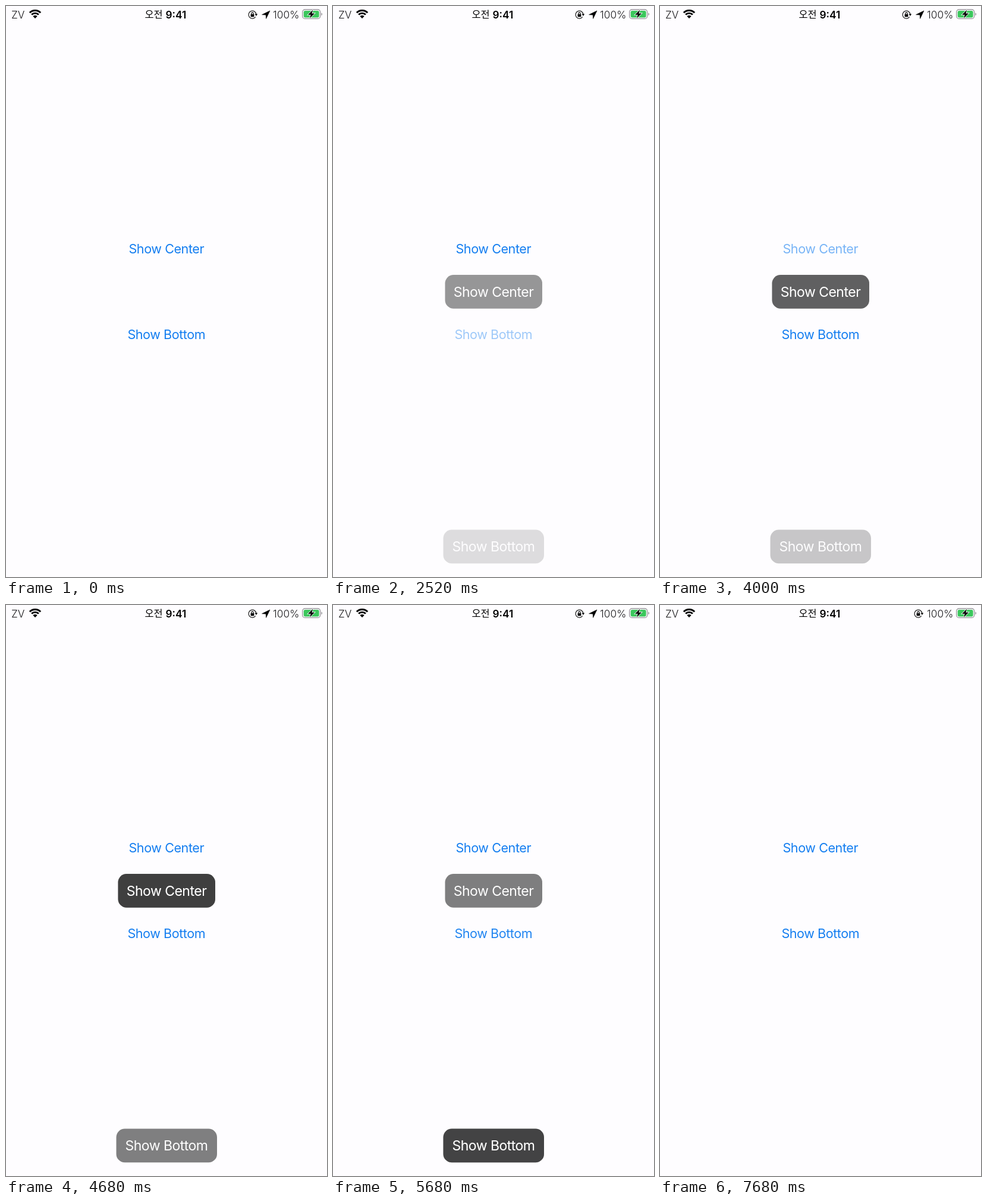
An HTML page for the animation above (7.76 s loop, 540 by 960 pixels).

```html
<!DOCTYPE html>
<html lang="ko">
<head>
<meta charset="utf-8">
<title>Toast demo</title>
<style>
  html, body { margin: 0; width: 100%; height: 100%; overflow: hidden; background: #fefdff; }
  svg { display: block; width: 540px; height: 960px; font-family: Inter, "Noto Sans", sans-serif; }
  .button { font-size: 21.6px; letter-spacing: -.021em; text-anchor: middle; fill: #147ef0; }
  .toast text { font-size: 23.04px; letter-spacing: -.023em; text-anchor: middle; fill: #fff; }
  .toast rect { fill: #000; fill-opacity: .5; }
  .status { font-size: 17.3px; }
  .thin { font-weight: 300; fill: #1c1c1e; }
  .clock { font-weight: 600; }
  .hangul { font: 500 16.4px "Noto Sans CJK KR", "Noto Sans CJK", sans-serif; }
</style>
</head>
<body>
<svg viewBox="0 0 540 960">
  <g class="status">
    <text class="thin" x="9" y="20.7">ZV</text>
    <g fill="none" stroke="#000" stroke-width="2.9">
      <path d="M39.8 11.3a13 13 0 0 1 18.4 0M43.1 14.6a8.3 8.3 0 0 1 11.8 0"/>
      <path d="M49 20.9l-3.6-3.6a5.1 5.1 0 0 1 7.2 0z" fill="#000" stroke="none"/>
    </g>
    <text class="hangul" x="233.5" y="20.3">오전</text>
    <text class="clock" x="268.5" y="20.6">9:41</text>
    <g id="lock">
      <path d="M419.7 18.4a6.4 6.4 0 1 1 1.2-4.4" fill="none" stroke="#222" stroke-width="1.3"/>
      <path d="M418.5 13.4h4.8l-2.4 3.4z"/>
      <rect x="411.6" y="13.7" width="5.8" height="4.5" rx=".8"/>
      <path d="M412.8 14v-1.4a1.7 1.7 0 0 1 3.4 0v1.4" fill="none" stroke="#000" stroke-width="1.1"/>
    </g>
    <path id="arrow" d="M444 8L430.6 14.6L437.2 15L437.6 21.3Z" stroke="#000" stroke-width=".6" stroke-linejoin="round"/>
    <text class="thin" x="449" y="20.7">100%</text>
    <rect x="498.7" y="6" width="30" height="15.4" rx="4.3" fill="none" stroke="#98989c" stroke-width="1.3"/>
    <rect x="500.7" y="8" width="26" height="11.4" rx="2.6" fill="#3bc75c"/>
    <path d="M530.4 11.2a2.7 2.7 0 0 1 0 5z" fill="#98989c"/>
    <path d="M516.3 6.6L508 14.8H512.7L510.9 20.8L519.2 12.4H514.4Z" stroke="#fff" stroke-width="1.6" paint-order="stroke"/>
  </g>
  <text id="centerButton" class="button" x="269.8" y="416.3">Show Center</text>
  <text id="bottomButton" class="button" x="269.8" y="560.3">Show Bottom</text>
  <g id="toasts"></g>
</svg>
<script>
  const LOOP = 7760, STEP = 40;
  const FADE_IN = 360, FADE_OUT = 440, LIFE = 1360, PRESS = 75;
  const ARROW_OFF = 5800;

  const byId = id => document.getElementById(id);
  const spots = {
    center: { label: 'Show Center', x: 188.5, y: 452, width: 163.5, button: byId('centerButton') },
    bottom: { label: 'Show Bottom', x: 185.5, y: 880.5, width: 169.5, button: byId('bottomButton') }
  };
  // Finger release times
  const taps = [
    ['center', 1040], ['bottom', 2400], ['center', 3640], ['center', 3830],
    ['bottom', 4340], ['center', 5250], ['bottom', 5380]
  ].map(([name, at]) => ({ spot: spots[name], at, toast: makeToast(spots[name]) }));

  function add(parent, tag, attrs) {
    const el = document.createElementNS('http://www.w3.org/2000/svg', tag);
    for (const key in attrs) el.setAttribute(key, attrs[key]);
    return parent.appendChild(el);
  }

  function makeToast({ label, x, y, width }) {
    const group = add(byId('toasts'), 'g', { class: 'toast', opacity: 0 });
    add(group, 'rect', { x, y, width, height: 56.8, rx: 14.4 });
    add(group, 'text', { x: 270, y: y + 36.5 }).textContent = label;
    return group;
  }

  function ease(p) {
    p = Math.min(1, Math.max(0, p));
    return p * p * (3 - 2 * p);
  }

  function draw(now) {
    const t = Math.floor(now % LOOP / STEP) * STEP;
    for (const spot of Object.values(spots)) spot.alpha = 1;
    for (const { spot, at, toast } of taps) {
      const age = t - at;
      const shown = ease(age / FADE_IN);
      toast.setAttribute('opacity', shown * (1 - ease((age - LIFE) / FADE_OUT)));
      if (age >= -PRESS) spot.alpha = Math.min(spot.alpha, .2 + .8 * shown);
    }
    for (const { button, alpha } of Object.values(spots)) button.setAttribute('opacity', alpha);
    const hidden = t >= ARROW_OFF;
    byId('arrow').setAttribute('opacity', hidden ? 0 : 1);
    byId('lock').setAttribute('transform', hidden ? 'translate(20)' : '');
  }

  const start = performance.now();
  function tick() {
    draw(performance.now() - start);
    requestAnimationFrame(tick);
  }
  tick();
</script>
</body>
</html>
```
